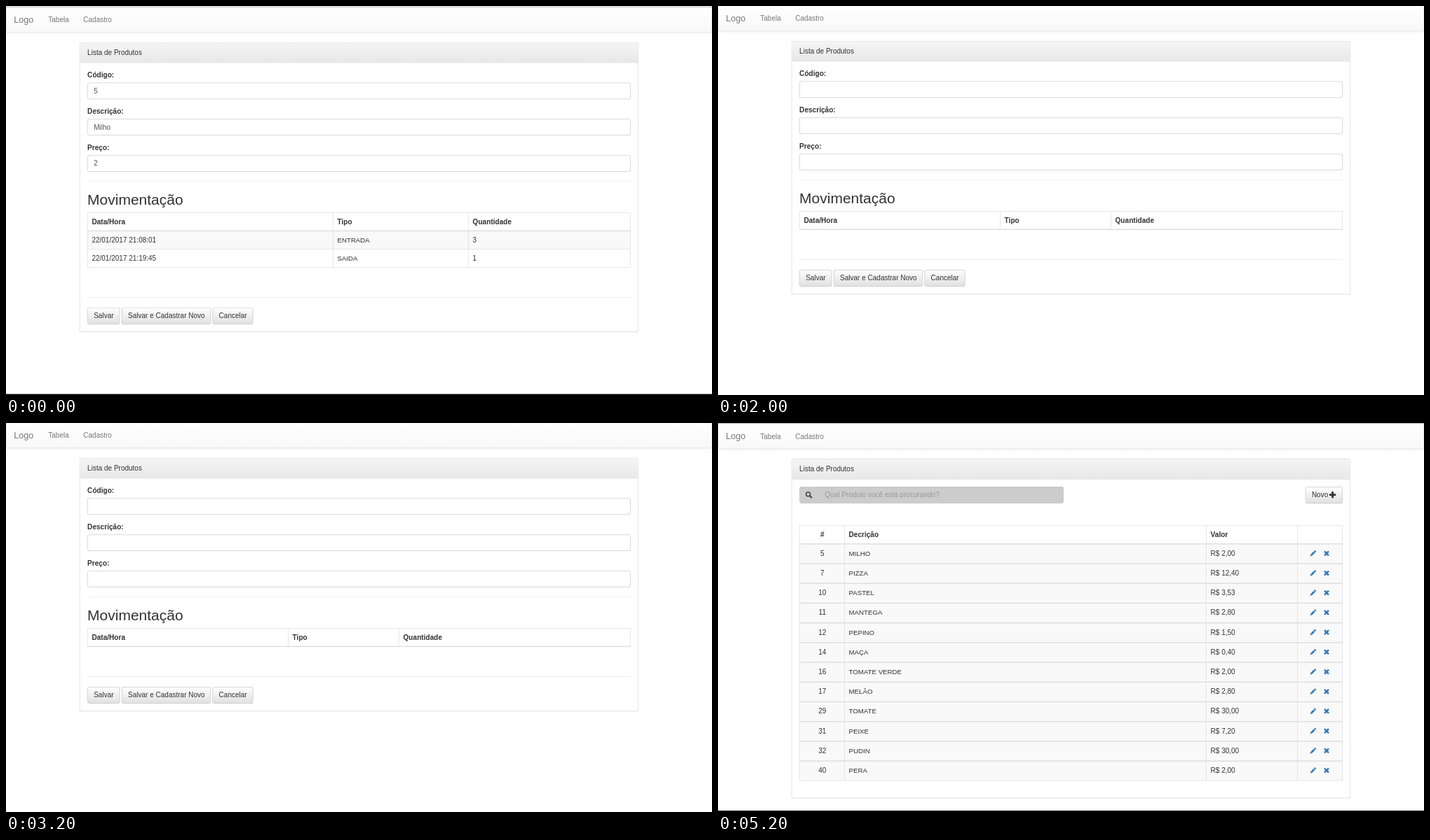
These frames come from a looping animation (1007x556 px, 6 s). An HTML page with a canvas:

```html
<!DOCTYPE html>
<html lang="pt-BR">
<head>
<meta charset="utf-8">
<title>Lista de Produtos</title>
<style>
  html, body { margin: 0; width: 100%; height: 100%; overflow: hidden; background: #fff; }
  canvas { display: block; }
</style>
</head>
<body>
<canvas id="stage" width="1007" height="556"></canvas>
<script>
const ctx = document.getElementById('stage').getContext('2d');
const W = 1007, H = 556, HOLD = 2000;
const LINE = 0.7;
const LEFT = 116.1, RIGHT = 890.9;
const FAMILY = '"Liberation Sans", Arial, sans-serif';

function text(str, x, mid, { size = 10, color = '#333', bold = false, align = 'left' } = {}) {
  ctx.font = `${bold ? 'bold ' : ''}${size}px ${FAMILY}`;
  ctx.fillStyle = color;
  ctx.textAlign = align;
  ctx.fillText(str, x, mid + size * 0.347);
}

function rect(x, y, w, h, color) {
  ctx.fillStyle = color;
  ctx.fillRect(x, y, w, h);
}

function round(x, y, w, h, r, fill) {
  ctx.beginPath();
  ctx.roundRect(x, y, w, h, r);
  ctx.fillStyle = fill;
  ctx.fill();
}

function fade(y, h, from, to) {
  const g = ctx.createLinearGradient(0, y, 0, y + h);
  g.addColorStop(0, from);
  g.addColorStop(1, to);
  return g;
}

// Bordered rounded box with an optional soft shadow.
function box(x, y, w, h, border, fill, shadow, r = 2.8) {
  ctx.save();
  if (shadow) {
    ctx.shadowColor = `rgba(0,0,0,${shadow.alpha})`;
    ctx.shadowBlur = shadow.blur;
    ctx.shadowOffsetY = LINE;
  }
  round(x, y, w, h, r, border);
  ctx.restore();
  round(x + LINE, y + LINE, w - 2 * LINE, h - 2 * LINE, Math.max(0, r - LINE), fill);
}

function navbar(y) {
  box(0, y, W, 36.4, '#e7e7e7', fade(y, 36.4, '#fff', '#f8f8f8'), { alpha: 0.075, blur: 3.5 });
  const mid = y + 18.2;
  text('Logo', 11.2, mid, { size: 12.6, color: '#777' });
  text('Tabela', 60.3, mid, { color: '#777' });
  text('Cadastro', 110.3, mid, { color: '#777' });
}

function panel(y, bottom) {
  box(104.9, y, 797.2, bottom - y, '#ddd', '#fff', { alpha: 0.05, blur: 1.4 });
  round(105.6, y + LINE, 795.8, 28, [2.1, 2.1, 0, 0], fade(y, 28.7, '#f5f5f5', '#e8e8e8'));
  rect(105.6, y + 28.7, 795.8, LINE, '#ddd');
  text('Lista de Produtos', LEFT, y + 14.7);
}

function input(x, y, w, value, color = '#555', r) {
  box(x, y, w, 23.8, '#ccc', '#fff', null, r);
  rect(x + 1.4, y + LINE, w - 2.8, LINE, 'rgba(0,0,0,.06)');
  text(value, x + 9.1, y + 11.9, { color });
}

function button(label, x, y, w) {
  box(x, y, w, 23.8, '#ccc', fade(y, 23.8, '#fff', '#e0e0e0'), { alpha: 0.075, blur: 1.4 });
  text(label, x + 9.1, y + 11.9);
}

function rule(y) {
  rect(LEFT, y, RIGHT - LEFT, LINE, '#e9e9e9');
}

function columns(xs, top, bottom) {
  for (const x of xs) rect(x, top, LINE, bottom - top, '#ddd');
}

function border(y, thick = LINE) {
  rect(LEFT, y, RIGHT - LEFT, thick, '#ddd');
}

function form({ top, bottom, values, cols, rows, ruleY, buttonY }) {
  navbar(top - 50.4);
  panel(top, bottom);
  ['Código:', 'Descrição:', 'Preço:'].forEach((label, i) => {
    const y = top + 46.9 + i * 51.75;
    text(label, LEFT, y, { bold: true, size: 10.1 });
    input(LEFT, y + 10.5, RIGHT - LEFT, values[i]);
  });
  rule(top + 198.4);
  text('Movimentação', LEFT, top + 225, { size: 21 });

  const head = top + 243.2, body = head + 26.2, pitch = 26.1;
  const xs = [LEFT, ...cols, RIGHT - LINE];
  rows.forEach((row, i) => {
    const y = body + i * pitch;
    if (i % 2 === 0) rect(LEFT, y, RIGHT - LEFT, pitch, '#f9f9f9');
    row.forEach((cell, c) =>
      text(cell, xs[c] + 6.3, y + 13.5, { size: c === 1 ? 9.7 : 10 }));
    border(y + pitch);
  });
  border(head);
  border(body - LINE, 1.4);
  columns(xs, head, body + rows.length * pitch + LINE);
  ['Data/Hora', 'Tipo', 'Quantidade'].forEach((label, c) =>
    text(label, xs[c] + 6.3, head + 13.4, { bold: true, size: 10.1 }));

  rule(ruleY);
  button('Salvar', LEFT, buttonY, 46.2);
  button('Salvar e Cadastrar Novo', 165, buttonY, 126.8);
  button('Cancelar', 294.5, buttonY, 57.9);
}

function stroke(points, width, color) {
  ctx.beginPath();
  points.forEach(([x, y]) => ctx.lineTo(x, y));
  ctx.lineWidth = width;
  ctx.strokeStyle = color;
  ctx.stroke();
}

function searchIcon(x, y) {
  ctx.beginPath();
  ctx.arc(x - 1, y - 1, 3, 0, Math.PI * 2);
  ctx.lineWidth = 1.5;
  ctx.strokeStyle = '#444';
  ctx.stroke();
  stroke([[x + 1.2, y + 1.2], [x + 4.4, y + 4.4]], 2, '#444');
}

function plusIcon(x, y) {
  rect(x - 4.6, y - 1.4, 9.2, 2.8, '#333');
  rect(x - 1.4, y - 4.6, 2.8, 9.2, '#333');
}

function pencilIcon(x, y) {
  const blue = '#337ab7';
  ctx.save();
  ctx.translate(x, y);
  ctx.rotate(-Math.PI / 4);
  rect(-3.2, -1.4, 5.6, 2.8, blue);
  rect(3, -1.4, 2.1, 2.8, blue);
  ctx.beginPath();
  ctx.moveTo(-3.2, -1.4);
  ctx.lineTo(-6, 0);
  ctx.lineTo(-3.2, 1.4);
  ctx.fill();
  ctx.restore();
}

function removeIcon(x, y) {
  const d = 3;
  stroke([[x - d, y - d], [x + d, y + d]], 2.5, '#337ab7');
  stroke([[x - d, y + d], [x + d, y - d]], 2.5, '#337ab7');
}

const products = [
  [5, 'MILHO', '2,00'], [7, 'PIZZA', '12,40'], [10, 'PASTEL', '3,53'],
  [11, 'MANTEGA', '2,80'], [12, 'PEPINO', '1,50'], [14, 'MAÇA', '0,40'],
  [16, 'TOMATE VERDE', '2,00'], [17, 'MELÃO', '2,80'], [29, 'TOMATE', '30,00'],
  [31, 'PEIXE', '7,20'], [32, 'PUDIN', '30,00'], [40, 'PERA', '2,00']
];

function list() {
  const top = 51.3, head = 146.3, body = 172.8, pitch = 28.21;
  rect(0, 0, W, 1, '#b8b8b8');
  navbar(top - 50.4);
  panel(top, 536.3);

  box(LEFT, 91.1, 30, 23.8, '#ccc', '#eee', null, [2.8, 0, 0, 2.8]);
  input(143.2, 91.1, 349.8, 'Qual Produto você está procurando?', '#999', [0, 2.8, 2.8, 0]);
  searchIcon(129.6, 102.8);
  button('Novo', 837.8, 91.1, 53.1);
  plusIcon(876.6, 102.6);

  const xs = [LEFT, 180.2, 696.3, 826.2, RIGHT - LINE];
  products.forEach(([id, name, price], i) => {
    const y = body + i * pitch, mid = y + 13.5;
    rect(LEFT, y, RIGHT - LEFT, pitch, '#f9f9f9');
    text(id, 148.8, mid, { align: 'center' });
    text(name, xs[1] + 6.3, mid, { size: 9.7 });
    text('R$ ' + price, xs[2] + 6.3, mid);
    pencilIcon(848.8, mid);
    removeIcon(868, mid);
  });
  border(head);
  products.forEach((_, i) => border(body + i * pitch - LINE, 1.4));
  const end = body + products.length * pitch;
  border(end - LINE);
  columns(xs, head, end);
  text('#', 148.8, 159.6, { bold: true, align: 'center' });
  text('Decrição', xs[1] + 6.3, 159.6, { bold: true, size: 10.1 });
  text('Valor', xs[2] + 6.3, 159.6, { bold: true, size: 10.1 });
  rect(0, 554, W, 2, '#000');
}

function filledForm() {
  rect(0, 0, W, 1, '#ededed');
  rect(0, 1, W, 1, '#b8b8b8');
  form({
    top: 52, bottom: 465.8, values: ['5', 'Milho', '2'], cols: [466.2, 659.3],
    rows: [['22/01/2017 21:08:01', 'ENTRADA', '3'], ['22/01/2017 21:19:45', 'SAIDA', '1']],
    ruleY: 416.2, buttonY: 430.9
  });
  rect(0, 554.6, W, 1.4, '#000');
}

function emptyForm() {
  form({
    top: 50, bottom: 412, values: ['', '', ''], cols: [402.3, 560.2],
    rows: [], ruleY: 362.2, buttonY: 377
  });
}

const scenes = [filledForm, emptyForm, list];
const start = performance.now();

function draw() {
  const t = performance.now() - start;
  rect(0, 0, W, H, '#fff');
  scenes[Math.floor(t / HOLD) % scenes.length]();
  requestAnimationFrame(draw);
}
draw();
</script>
</body>
</html>
```
